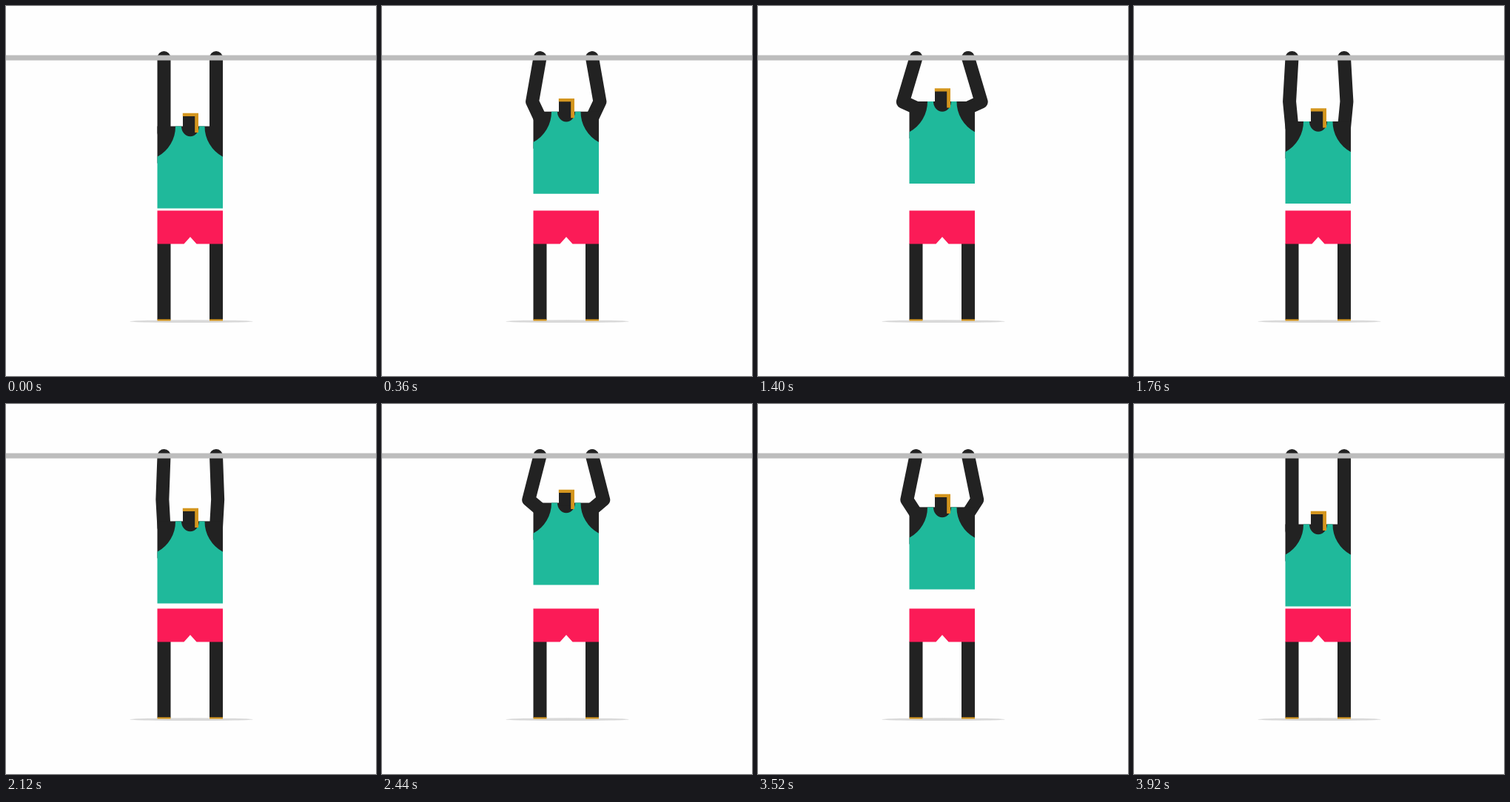
An HTML page for the animation above (4000 ms loop, 500x500 px).

```html
<!DOCTYPE html>
<html lang="en">
<head>
<meta charset="utf-8">
<title>Pull-ups</title>
<style>
  html, body { margin: 0; width: 100%; height: 100%; overflow: hidden; background: #fefefe; }
  svg { display: block; width: 100vw; height: 100vh; }
  .arm { fill: none; stroke: #222; stroke-width: 18; stroke-linecap: round; stroke-linejoin: round; }
</style>
</head>
<body>
<svg viewBox="0 0 500 500">
  <ellipse cx="250.5" cy="426.2" rx="83" ry="1.9" fill="#d9d9d9"/>

  <g fill="#222">
    <rect x="204.5" y="321" width="18" height="103"/>
    <rect x="275" y="321" width="18" height="103"/>
  </g>
  <g fill="#d4961f">
    <rect x="204.5" y="423.3" width="18" height="2.2"/>
    <rect x="275" y="423.3" width="18" height="2.2"/>
  </g>
  <path fill="#fb1b57" d="M204.5 276.5H293V321.5H257.5L249 312L240.5 321.5H204.5Z"/>

  <path class="arm" id="left"/>
  <path class="arm" id="right"/>

  <g id="torso">
    <rect x="204.5" y="162.5" width="88.5" height="50" fill="#222"/>
    <path fill="#1fb99b" d="M229 162.5H237A12 13.8 0 0 0 261 162.5H268.5A46.5 46.5 0 0 0 293 203.8V273.5H204.5V203.8A46.5 46.5 0 0 0 229 162.5Z"/>
    <rect x="239" y="148" width="17" height="18" fill="#222"/>
    <path fill="#d4961f" d="M238.8 144.8H260V171H255.2V149H238.8Z"/>
  </g>

  <rect x="0" y="66.5" width="500" height="7" fill="#bdbdbd"/>
</svg>
<script>
  const LOOP = 4000, STEP = 40, ACTIVE = 3920, HALF = 980;
  const LIFT = 42.3, FLARE = 22.3;
  const MID = 248.75, ARM = 35.25;
  const left = document.getElementById('left');
  const right = document.getElementById('right');
  const torso = document.getElementById('torso');

  // Cubic Bezier ease (.33, 0, .36, 1), solved by bisection
  function ease(x) {
    if (x <= 0 || x >= 1) return x <= 0 ? 0 : 1;
    let lo = 0, hi = 1, s = 0.5;
    for (let i = 0; i < 24; i++) {
      s = (lo + hi) / 2;
      const r = 1 - s;
      const bx = 3 * 0.33 * s * r * r + 3 * 0.36 * s * s * r + s * s * s;
      if (bx < x) lo = s; else hi = s;
    }
    return s * s * (3 - 2 * s);
  }

  function armPath(side, p) {
    const x = MID + side * ARM;
    const elbowX = x + side * FLARE * p;
    const elbowY = 129 + 0.6 * p;
    const shoulderY = 171.2 - LIFT * p;
    return `M${x} 70L${elbowX} ${elbowY}L${x} ${shoulderY}`;
  }

  function draw(ms) {
    const t = Math.min(Math.floor((ms % LOOP) / STEP) * STEP, ACTIVE);
    const u = (t % (2 * HALF)) / HALF;
    const p = ease(u < 1 ? u : 2 - u);
    left.setAttribute('d', armPath(-1, p));
    right.setAttribute('d', armPath(1, p));
    torso.setAttribute('transform', `translate(0 ${-LIFT * p})`);
  }

  let start = null;
  function tick(now) {
    if (start === null) start = now;
    draw(now - start);
    requestAnimationFrame(tick);
  }
  draw(0);
  requestAnimationFrame(tick);
</script>
</body>
</html>
```
